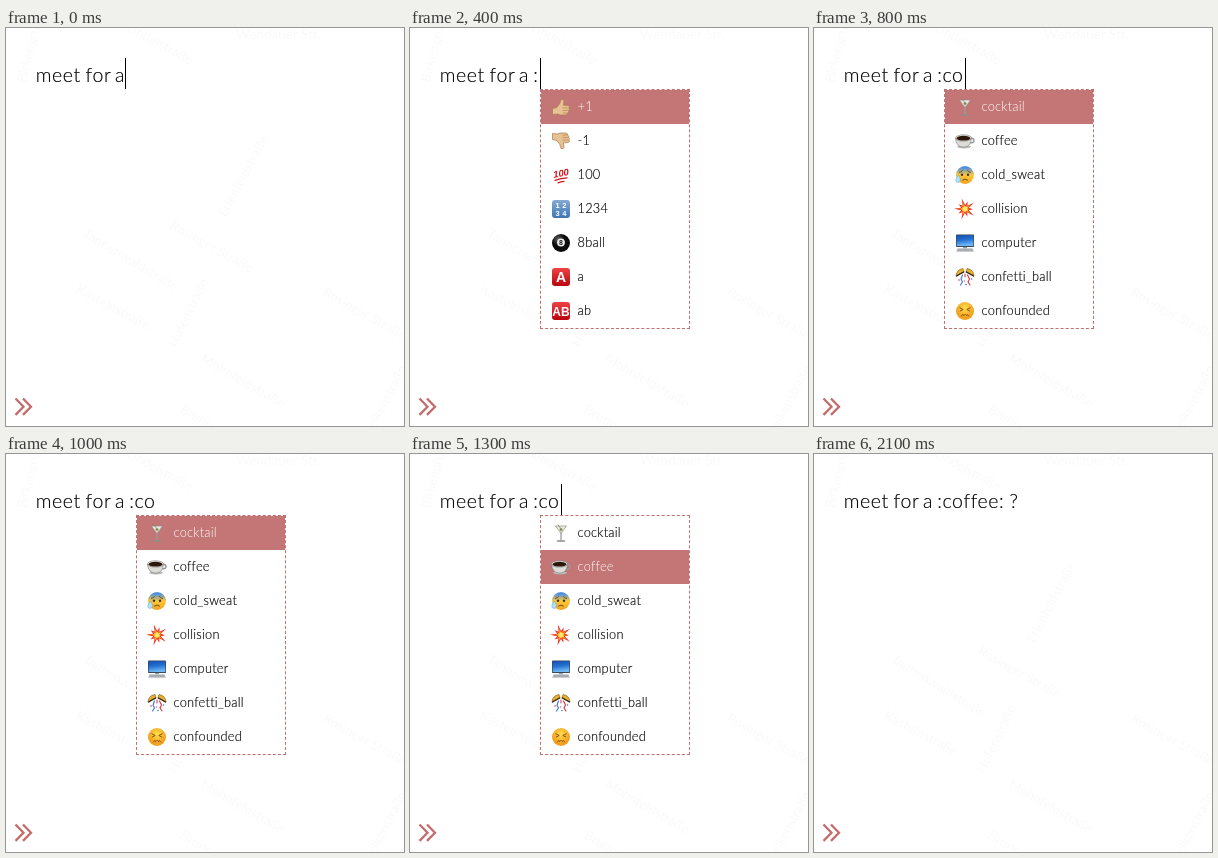
Write an HTML page that moves like this. It is 398 px wide and 398 px high and loops after 2400 ms.

```html
<!DOCTYPE html>
<html lang="en">
<head>
<meta charset="utf-8">
<title>Emoji completion</title>
<style>
html, body { margin: 0; height: 100%; overflow: hidden; background: #fff; }
svg { display: block; width: 398px; height: 398px; font-family: Lato, "Open Sans", sans-serif; font-weight: 300; }
#frame { position: absolute; left: 130px; top: 61px; width: 148px; height: 238px; border: 1px dashed #c07070; }
.street { font-size: 13.5px; font-weight: 400; fill: #fafafa; }
.line { font-size: 19.5px; letter-spacing: .6px; fill: #000; stroke: #000; stroke-width: .15px; }
.item { font-size: 12.8px; letter-spacing: .25px; fill: #000; stroke: #000; stroke-width: .15px; }
.item.on { fill: #fff; stroke: none; }
.bold { font-family: "Liberation Sans", Arial, sans-serif; font-weight: 700; text-anchor: middle; }
</style>
</head>
<body>
<svg viewBox="0 0 398 398">
  <defs>
    <linearGradient id="red" x2="0" y2="1"><stop stop-color="#ee4247"/><stop offset="1" stop-color="#b9050d"/></linearGradient>
    <linearGradient id="blue" x2="0" y2="1"><stop stop-color="#86aad3"/><stop offset="1" stop-color="#3d76b5"/></linearGradient>
    <linearGradient id="violet" x2="0" y2="1"><stop stop-color="#b84be0"/><stop offset="1" stop-color="#7a13b4"/></linearGradient>
    <linearGradient id="screen" x2=".2" y2="1"><stop stop-color="#1450b4"/><stop offset=".5" stop-color="#2470d2"/><stop offset="1" stop-color="#6db8f4"/></linearGradient>
    <linearGradient id="cold" x2="0" y2="1"><stop offset=".1" stop-color="#4d8fe0"/><stop offset=".5" stop-color="#fbc93a"/><stop offset="1" stop-color="#f0a21e"/></linearGradient>
    <radialGradient id="warm" cy=".35"><stop stop-color="#ffe04d"/><stop offset="1" stop-color="#f3a01e"/></radialGradient>
    <radialGradient id="ball" cx=".35" cy=".3"><stop stop-color="#666"/><stop offset=".7" stop-color="#0a0a0a"/></radialGradient>
  </defs>
  <g id="map" class="street"></g>
  <path d="M9.5 370.5l8 8.2-8 8.2M17 370.5l8 8.2-8 8.2" fill="none" stroke="#c46c6c" stroke-width="2.3"/>
  <g id="stage"></g>
</svg>
<div id="frame"></div>
<script>
const $ = id => document.getElementById(id);

const fill = (d, color, extra = '') => `<path d="${d}" fill="${color}" ${extra}/>`;
const line = (d, color, w = 1) =>
  `<path d="${d}" fill="none" stroke="${color}" stroke-width="${w}" stroke-linecap="round" stroke-linejoin="round"/>`;
const dot = (x, y, r, color) => `<circle cx="${x}" cy="${y}" r="${r}" fill="${color}"/>`;
const box = (x, y, w, h, color, r = 0) =>
  `<rect x="${x}" y="${y}" width="${w}" height="${h}" rx="${r}" fill="${color}"/>`;
const bold = (x, y, size, text, color = '#fff') =>
  `<text class="bold" x="${x}" y="${y}" font-size="${size}" fill="${color}">${text}</text>`;
const tile = color => box(0, 0, 18, 18, `url(#${color})`, 3);

const thumb = fill('M.5 10.5l4-.8 3.2-4L9 1.6q2.6-1.2 3 1.4l-.6 4.2 5 .3q1.6 1 .6 2.6.8 1.2-.3 2.5.4 1.6-.9 2.2 0 2-2.4 2.2H8l-2.5-1-5 .6z',
  '#e8c294', 'stroke="#a67a48" stroke-width=".7"') + line('M11 10h5M11 12.5h5M11 15h4.4', '#b4854f', .7);

function star(outer, inner, color) {
  let d = '';
  for (let i = 0; i < 20; i++) {
    const r = i % 2 ? inner : outer * (i % 4 ? .72 : 1), a = i * Math.PI / 10 + .65;
    d += `${i ? 'L' : 'M'}${(9 + r * Math.cos(a)).toFixed(1)} ${(9 + r * Math.sin(a)).toFixed(1)}`;
  }
  return fill(d + 'z', color);
}

// Icons on an 18 by 18 grid
const icons = {
  '+1': thumb,
  '-1': `<g transform="matrix(1 0 0 -1 0 18)">${thumb}</g>`,
  '100': `<g transform="rotate(-10 9 9) skewX(-12)">${bold(11, 10.5, 9.5, '100', '#d8141c')}</g>`
    + line('M3 14.3q6-2.3 12-2.5M6 16.8q3-1.2 6-1.4', '#d8141c', 1.3),
  '1234': tile('blue') + bold(5.6, 8.2, 7.5, '1') + bold(12.4, 8.2, 7.5, '2') + bold(5.6, 15.6, 7.5, '3') + bold(12.4, 15.6, 7.5, '4'),
  '8ball': dot(9, 9, 9, 'url(#ball)') + dot(9, 8.5, 3.9, '#eee') + bold(9, 11, 7, '8', '#111'),
  a: tile('red') + bold(9, 14, 14, 'A'),
  ab: tile('red') + bold(9, 13.6, 12, 'AB'),
  cactus: line('M9 2.5V16', '#3b8f36', 5) + line('M3 6v3q0 2 4 2M15 5v3q0 2-4 2', '#3b8f36', 3)
    + line('M8 3v13M10.3 3v13', '#74bb55', .7) + box(4, 16.5, 10, 1.5, '#a8824f', .7),
  cake: fill('M1 9l11-4 5 3v7L5 17l-4-2z', '#f0d79a') + fill('M1 8l10-4 6 3.5L5 10.5z', '#fffaf0', 'stroke="#d8c7ae" stroke-width=".5"')
    + line('M1.3 11.5L5 13.4l12-2.8', '#d84a4a', 1.5) + line('M1.3 15L5 16.6l12-2.2', '#b98545', 1) + dot(10, 4, 2.7, '#d9222d') + dot(9.2, 3.2, .8, '#f58a8a'),
  calendar: box(.5, 1, 17, 16.5, '#555', 1.5) + box(1.5, 2, 15, 4.5, '#c8383b') + box(2, 6.5, 14, 9.8, '#f3f3f3')
    + box(4, 0, 1.5, 4, '#ddd') + box(12.5, 0, 1.5, 4, '#ddd') + bold(9, 15, 9, '17', '#222'),
  calling: box(6.5, 0, 11, 18, '#222', 1.8) + box(7.5, 2.3, 9, 12.5, '#06172b')
    + [0, 1, 2, 3].map(r => [0, 1, 2].map(c => box(8.3 + c * 2.8, 3.3 + r * 2.9, 1.6, 1.6, ['#37a7e8', '#5ac16a', '#2d6cc9'][(r + c) % 3])).join('')).join('')
    + dot(12, 16.4, .8, '#777') + fill('M-1 7.5h4V5l5 4.2-5 4.2V11h-4z', '#2380e0'),
  camel: fill('M1 4q1-2 3-1l1 4q1 1 2-1 2-4 4 0 2-3 4 1l3 4-1 1-1 5h-1.3l-.3-4-2-1-5 0-.5 5H5.7L6 12Q3 11 2.7 6L0 6z', '#d9a452', 'stroke="#a77431" stroke-width=".5"')
    + line('M11 11.5l.3 4.5', '#b07c37', 1.2),
  camera: box(5.5, 2, 7, 4, '#8c949c', 1) + box(0, 4, 18, 12, '#a9b1b9', 1.5) + box(0, 7, 18, 7, '#5f6870') + dot(9, 10, 5, '#d2d7dc')
    + dot(9, 10, 3.8, '#252c38') + dot(9, 10, 2, '#4a71a8') + dot(8, 9, .8, '#dbe9ff') + box(1.5, 5, 2.5, 1.3, '#eee'),
  cancer: tile('violet') + line('M3.5 7.5Q8-.5 15 5.5M14.5 10.5q-4.5 8-11.5 2', '#fff', 1.5)
    + '<g fill="none" stroke="#fff" stroke-width="1.5"><circle cx="5.5" cy="7.5" r="2"/><circle cx="12.5" cy="10.5" r="2"/></g>',
  cocktail: fill('M3.5 2h11L9 9.5z', '#eceae4', 'stroke="#8d8d88" stroke-width=".7"') + fill('M5.5 4.7h7L9 9z', '#d5d2c0')
    + line('M9 9v7', '#9a9d98', 1.3) + line('M5.5 17h7', '#8b8f88', 1.5) + line('M6 1l4 5', '#8d7040', .7) + dot(9, 5.5, 1.2, '#7d8a48'),
  coffee: '<ellipse cx="8" cy="14.8" rx="7" ry="1.6" fill="#bbb"/><ellipse cx="15.6" cy="8.5" rx="2.4" ry="2.2" fill="none" stroke="#999" stroke-width="1.4"/>'
    + fill('M-.5 6q.5 9 8.3 9.2Q15 15 15.5 6z', '#dcdcd9', 'stroke="#777" stroke-width=".6"')
    + '<ellipse cx="7.5" cy="6" rx="8" ry="3.2" fill="#efefec" stroke="#777" stroke-width=".6"/><ellipse cx="7.5" cy="6.2" rx="6.8" ry="2.4" fill="#2d170b"/>',
  cold_sweat: dot(9, 9, 9, 'url(#cold)') + line('M3.5 6.5q2-.3 3-2M14.5 6.5q-2-.3-3-2M6.5 14q2.5-2 5 0', '#6b3d12', .9)
    + dot(6, 8.8, 1.2, '#4b2b10') + dot(12, 8.8, 1.2, '#4b2b10') + fill('M2.5 9q3.3 5 .8 7.2Q-1 17 0 13z', '#b5e2fb', 'stroke="#4c9fd6" stroke-width=".5"'),
  collision: star(11, 4, '#e5261f') + star(7.5, 2.8, '#ff8a1c') + star(4.5, 2, '#ffec69'),
  computer: box(0, .5, 18, 12.5, '#3b4656', .8) + box(.7, 1.2, 16.6, 10.8, 'url(#screen)')
    + box(7, 13, 4, 1.5, '#92989e') + fill('M1.5 14.2h15l1.5 3.6H0z', '#c3c7cb') + line('M2 15.4h14M1.5 16.7h15', '#8e949a', .6),
  confetti_ball: fill('M0 8Q.5 1.5 7 .5l1 3z', '#e8b02f', 'stroke="#7d5512" stroke-width=".6"') + fill('M18 8Q17.500 1.5 11 .5l-1 3z', '#e8b02f', 'stroke="#7d5512" stroke-width=".6"')
    + line('M.5 8l7.200-4M17.500 8l-7.200-4', '#33230c', 1.4) + line('M6.500 7l-1.500 4 1.500 3-2 3', '#3677d8', 1.1)
    + line('M11.500 7l2 4-1.500 3 2 3', '#d8323a', 1.1) + line('M9 6v3', '#d8323a', 1)
    + dot(3, 12, .8, '#d8323a') + dot(15.500, 11, .8, '#3677d8') + dot(8.500, 13, .8, '#e660a2') + dot(10, 16.500, .8, '#3677d8'),
  confounded: dot(9, 9, 9, 'url(#warm)') + line('M3.800 5.800l3.400 1.700-3 1.500M14.200 5.800l-3.400 1.700 3 1.500M5.500 14l1.200-1.500 1.200 1L9 12.300l1.200 1.200 1.200-1 1.200 1.500', '#7a4312', .9)
};

const lists = {
  ':': ['+1', '-1', '100', '1234', '8ball', 'a', 'ab'],
  c: ['cactus', 'cake', 'calendar', 'calling', 'camel', 'camera', 'cancer'],
  co: ['cocktail', 'coffee', 'cold_sweat', 'collision', 'computer', 'confetti_ball', 'confounded']
};

// Start time, typed text, caret x (0 = hidden), list, selected row
const steps = [
  [0, 'meet for a', 119],
  [100, 'meet for a', 124],
  [300, 'meet for a :', 130],
  [400, 'meet for a :', 130, ':', 0],
  [500, 'meet for a :c', 140, ':', 0],
  [600, 'meet for a :c', 140, 'c', 0],
  [800, 'meet for a :co', 151, 'co', 0],
  [1000, 'meet for a :co', 0, 'co', 0],
  [1100, 'meet for a :co', 0, 'co', 1],
  [1300, 'meet for a :co', 151, 'co', 1],
  [1500, 'meet for a :coffee:', 196],
  [1700, 'meet for a :coffee:', 0],
  [1900, 'meet for a :coffee: ?', 206],
  [2100, 'meet for a :coffee: ?', 0]
];
const wordX = [29.7, 79.6, 109, 123.2, 195.6];

function popup(name, selected) {
  const rows = lists[name].map((label, i) => {
    const y = 62 + i * 34, on = i === selected;
    return (on ? box(131, y, 148, 34, '#c47575') : '')
      + `<g transform="translate(142 ${y + 8})">${icons[label]}</g>`
      + `<text class="item${on ? ' on' : ''}" x="167.5" y="${y + 21}">${label}</text>`;
  });
  return box(130, 61, 150, 240, '#fff') + rows.join('');
}

function draw([, text, caret, list, selected]) {
  const words = text.split(' ').map((w, i) => `<tspan x="${wordX[i]}">${w}</tspan>`).join('');
  $('frame').hidden = !list;
  $('stage').innerHTML = `<text class="line" y="53.5">${words}</text>`
    + (list ? popup(list, selected) : '')
    + (caret ? box(caret, 30, 1, 31, '#000') : '');
}

$('map').innerHTML = [
  [20, 55, -76, 'Birkengrund'], [120, 2, 29, 'Lindelstraße'], [230, 11, 0, 'Wendauer Str.'],
  [76, 208, 31, 'Tannenwaldstraße'], [163, 200, 29, 'Rosinger Straße'], [69, 264, 28, 'Kastelnstraße'],
  [220, 190, -62, 'Erlenfeldstraße'], [170, 320, -64, 'Hufenstraße'], [316, 267, 29, 'Rosinger Straße'],
  [194, 333, 30, 'Mohnfeldstraße'], [173, 384, 30, 'Brunnweg'], [364, 410, -62, 'Nelkenstraße']
].map(([x, y, turn, name]) => `<text transform="translate(${x} ${y}) rotate(${turn})">${name}</text>`).join('');

let shown;
const start = performance.now();
function tick() {
  const t = (performance.now() - start) % 2400;
  const step = steps.filter(s => s[0] <= t).pop();
  if (step !== shown) draw(shown = step);
  requestAnimationFrame(tick);
}
tick();
</script>
</body>
</html>
```
